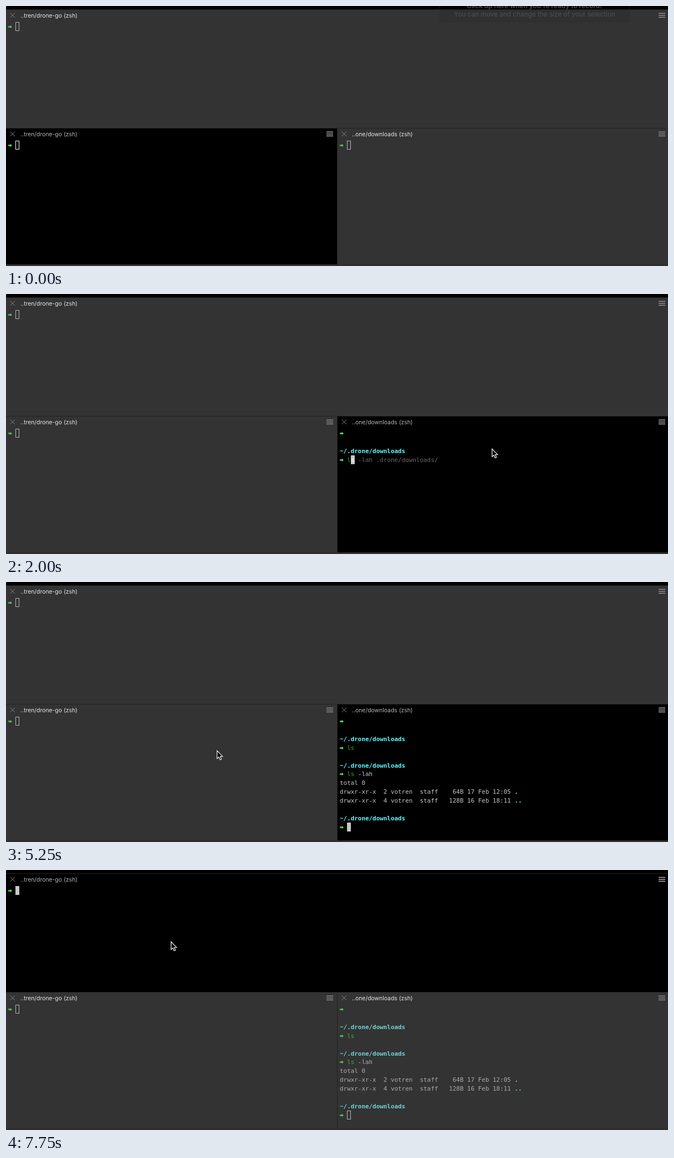
An HTML page with a canvas for the animation above (8000 ms loop, 1194 px wide and 469 px high).

```html
<!DOCTYPE html>
<html lang="en">
<head>
<meta charset="utf-8">
<title>Split terminal</title>
<style>
  html, body { margin: 0; width: 100%; height: 100%; overflow: hidden; background: #000; }
  canvas { display: block; }
</style>
</head>
<body>
<canvas id="stage" width="1194" height="469"></canvas>
<script>
const ctx = document.getElementById('stage').getContext('2d');
const LOOP = 8000, STEP = 250;
const COL = 6.57, ROW = 15.9;
const MONO = '10.92px "DejaVu Sans Mono", monospace';
const SANS = 'Inter, sans-serif';

const ACTIVE = { bg: '#000', title: '#b4b4b4', menu: '#b0b0b0', arrow: '#5ff967',
  text: '#c7c7c7', green: '#25ad25', cyan: '#60fdff', caret: '#c7c7c7' };
const IDLE = { bg: '#333', title: '#e4e4e4', menu: '#8c8c8c', arrow: '#5ccb62',
  text: '#adadad', green: '#45a945', cyan: '#72d4d5', caret: '#b4b4b4' };

const HOME = '..tren/drone-go (zsh)';
const top_ = { x: 0, y: 7, w: 1194, h: 213, menu: 1177, title: HOME };
const left = { x: 0, y: 221, w: 597, h: 245, menu: 578, title: HOME };
const right = { x: 598, y: 221, w: 596, h: 245, menu: 1177, title: '..one/downloads (zsh)' };
const panes = [top_, left, right];

// Keys pressed in each step from 500 ms on; "$" is the prompt appearing.
const keys = '||\n||$||l|s|\n|$||l|s |-l|a|h|\n|$'.split('|');
const HISTORY = 'ls -lah .drone/downloads/';
const listing = ['total 0',
  'drwxr-xr-x  2 votren  staff    64B 17 Feb 12:05 .',
  'drwxr-xr-x  4 votren  staff   128B 16 Feb 18:11 ..'];

// Pointer glides: each decays towards its goal, bowed upwards by lift.
const origin = { x: 1009, y: -180 };
const glides = [
  { start: -250, x: 876, y: 279, lift: 0 },
  { start: 4500, x: 380, y: 304, lift: 860 },
  { start: 7250, x: 291, y: 117, lift: 0 }
];
const clicks = [500, 5500, 7750];

const tipShape = new Path2D('M0 0V14L3.2 11.2 5.5 16.3 7.9 15.2 5.7 10.3 10 10.1Z');
const arrowShape = new Path2D('M0-.9H3.8L3.3-2.7 7 0 3.3 2.7 3.8.9H0Z');

function pointerAt(t) {
  let pos = origin;
  for (const { start, x, y, lift } of glides) {
    const steps = (t - start) / STEP;
    if (steps <= 0) break;
    const rest = steps < 3 ? 0.257 ** steps : 0;
    pos = {
      x: x + (pos.x - x) * rest,
      y: y + (pos.y - y) * rest - lift * rest * (1 - rest)
    };
  }
  return pos;
}

function focusedPane(t) {
  const click = clicks.filter(c => c <= t).pop();
  if (click === undefined) return left;
  const p = pointerAt(click);
  return panes.find(r => p.x >= r.x && p.x < r.x + r.w && p.y >= r.y && p.y < r.y + r.h);
}

function box(x, y, w, h, color) {
  ctx.fillStyle = color;
  ctx.fillRect(x, y, w, h);
}

function label(text, x, y, color, font) {
  ctx.font = font;
  ctx.fillStyle = color;
  ctx.fillText(text, x, y);
}

function drawShape(shape, x, y, fill, stroke) {
  ctx.save();
  ctx.translate(x, y);
  ctx.fillStyle = fill;
  ctx.fill(shape);
  if (stroke) {
    ctx.strokeStyle = stroke;
    ctx.lineWidth = 1.2;
    ctx.stroke(shape);
  }
  ctx.restore();
}

function write(pane, row, col, text, color, bold) {
  label(text, pane.x + 4 + col * COL, Math.round(pane.y + 34 + row * ROW), color,
    (bold ? 'bold ' : '') + MONO);
}

function drawArrow(pane, row, color) {
  drawShape(arrowShape, pane.x + 4, Math.round(pane.y + 30 + row * ROW) + 0.5, color);
}

function drawCaret(pane, row, col, color, solid) {
  const x = Math.round(pane.x + 4 + col * COL), y = Math.round(pane.y + 22 + row * ROW);
  if (solid) return box(x, y, 7, 16, color);
  ctx.strokeStyle = color;
  ctx.lineWidth = 1;
  ctx.strokeRect(x + 0.5, y + 0.5, 6, 15);
}

function drawFrame({ x, y, w, h, menu, title }, colors) {
  box(x, y, w, h, colors.bg);
  ctx.strokeStyle = '#858585';
  ctx.lineWidth = 1;
  ctx.beginPath();
  ctx.moveTo(x + 7.5, y + 5.5); ctx.lineTo(x + 16, y + 14);
  ctx.moveTo(x + 16, y + 5.5); ctx.lineTo(x + 7.5, y + 14);
  ctx.stroke();
  label(title, x + 26, y + 13.5, colors.title, '10.4px ' + SANS);
  for (let i = 0; i < 3; i++) box(menu, y + 5.6 + i * 3.5, 12, 1.5, colors.menu);
}

// Replays the keys up to time t into lines, the caret row and the open command.
function replay(t) {
  const session = { lines: [{ prompt: true, text: '' }], row: 0 };
  const done = keys.slice(0, Math.max(0, (t - 500) / STEP + 1)).join('');
  for (const key of done) {
    const { lines, row } = session;
    if (key === '\n') {
      if (lines[row].text === 'ls -lah') listing.forEach(text => lines.push({ text }));
      session.row = lines.length;
    } else if (key === '$') {
      lines.push({ text: '' }, { path: true, text: '~/.drone/downloads' }, { prompt: true, text: '' });
      session.row = lines.length - 1;
    } else {
      lines[row].text += key;
    }
  }
  return session;
}

function suggest(typed, lines) {
  const past = lines.slice(0, -1).filter(l => l.prompt).map(l => l.text).reverse();
  const hint = [...past, HISTORY].find(c => c.length > typed.length && c.startsWith(typed));
  return typed && hint ? hint.slice(typed.length) : '';
}

function drawLine(pane, row, { text, prompt, path }, colors) {
  if (prompt) {
    drawArrow(pane, row, colors.arrow);
    write(pane, row, 2, text.slice(0, 2), colors.green);
    write(pane, row, 4, text.slice(2), colors.text);
  } else if (path) {
    write(pane, row, 0, text, colors.cyan, true);
  } else {
    const body = text.replace(/\.+$/, '');
    write(pane, row, 0, body, colors.text);
    write(pane, row, body.length, text.slice(body.length), colors.cyan, true);
  }
}

function drawSession(pane, { lines, row }, colors, caretColor, solid) {
  const open = lines[row];
  const col = open ? 2 + open.text.length : 0;
  lines.forEach((line, i) => drawLine(pane, i, line, colors));
  drawCaret(pane, row, col, caretColor, solid);
  if (!open) return;
  const hint = suggest(open.text, lines);
  write(pane, row, col, hint.slice(0, 1), '#fff');
  write(pane, row, col + 1, hint.slice(1), '#686868');
}

function drawTip() {
  ctx.beginPath();
  ctx.roundRect(782.5, -20, 342, 48.5, 4);
  ctx.fillStyle = 'rgba(0,0,0,.06)';
  ctx.fill();
  ctx.setLineDash([2, 2]);
  ctx.strokeStyle = '#282828';
  ctx.lineWidth = 1;
  ctx.stroke();
  ctx.setLineDash([]);
  ctx.textAlign = 'center';
  label('Click up here when you\'re ready to record!', 953, 3.5, '#484848', 'bold 11.8px ' + SANS);
  label('You can move and change the size of your selection', 953.5, 19, '#505050', '11.8px ' + SANS);
  ctx.textAlign = 'left';
}

function draw(t) {
  const focused = focusedPane(t), clicked = t >= clicks[0];
  box(0, 0, 1194, 469, '#000');
  box(0, 6, 1194, 1, '#222');
  box(0, 220, 1194, 1, '#222');
  box(597, 220, 1, 246, '#222');
  box(0, 466, 1194, 3, '#302e2f');

  for (const pane of panes) {
    const active = pane === focused, colors = active ? ACTIVE : IDLE;
    const caretColor = active && !clicked ? '#fff' : colors.caret;
    drawFrame(pane, colors);
    drawSession(pane, replay(pane === right ? t : 0), colors, caretColor, active && clicked);
  }

  if (t < STEP) return drawTip();
  const { x, y } = pointerAt(t);
  drawShape(tipShape, Math.round(x) + 0.7, Math.round(y) + 0.5, '#000', '#f4f4f4');
}

const began = performance.now();
let shown = -1;
function tick() {
  const elapsed = Math.max(0, performance.now() - began) % LOOP;
  const t = Math.floor(elapsed / STEP) * STEP;
  if (t !== shown) draw(shown = t);
  requestAnimationFrame(tick);
}
tick();
</script>
</body>
</html>
```
